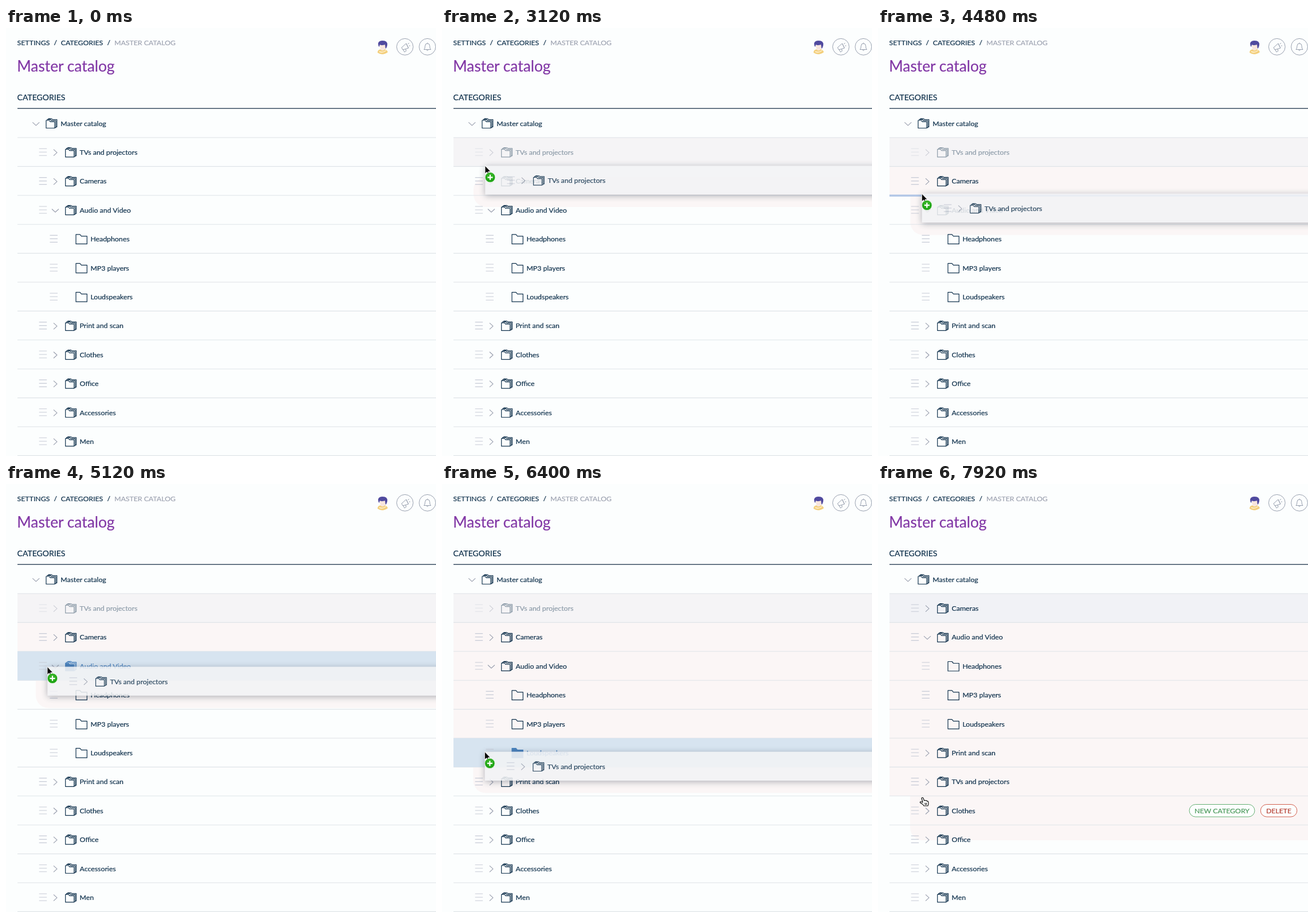
Write an HTML page that moves like this. It is 750 by 746 pixels and loops after 8 s.

```html
<!DOCTYPE html>
<html lang="en">
<head>
<meta charset="utf-8">
<title>Category tree</title>
<style>
  html, body { margin: 0; width: 100%; height: 100%; overflow: hidden; background: #fcfefe; }
  svg { display: block; width: 100%; height: 100%; font: 12.3px Lato, sans-serif; }
  text { fill: #11324d; stroke: #11324d; stroke-width: .22; white-space: pre; }
  path, line { fill: none; stroke-linejoin: round; }
  .folder { stroke: #11324d; stroke-width: 1.2; }
  .grip { stroke: #c7cbd6; stroke-width: 1.1; }
  .chevron { stroke: #999fae; stroke-width: 1.1; }
  .rule { stroke: #dfe4e8; stroke-width: 1.1; }
  .target text { fill: #4a82bd; stroke: #4a82bd; }
  .target .folder { stroke: #4a82bd; }
  .target .front { fill: #4a82bd; }
  .muted { fill: #a0a5b3; stroke: #a0a5b3; }
  .title { fill: #8238a6; stroke: #8238a6; font-size: 26.3px; }
  .create { fill: #4c9a5c; stroke: #4c9a5c; }
  .delete { fill: #b63f32; stroke: #b63f32; }
  .icon { fill: none; stroke: #98a0af; stroke-width: 1; }
  .hand path { fill: #fff; stroke: #111; stroke-width: 1.2; stroke-linecap: round; }
  #ghost { filter: drop-shadow(0 2px 6px rgba(40, 50, 70, .42)); }
</style>
</head>
<body>
<svg viewBox="0 0 750 746" preserveAspectRatio="none">
  <rect width="750" height="746" fill="#fcfefe"/>
  <g id="trail" fill="#fbf6f6">
    <rect id="trailEdge" y="260" width="800" rx="22"/>
    <rect id="trailRows" x="20" y="191" width="730"/>
  </g>
  <rect id="hover" x="20" y="191" width="730" height="50.4" fill="#f1f2f6"/>
  <g id="rules"></g>
  <rect id="into" x="20" width="730" height="50.4" fill="#d7e4f0"/>
  <rect id="between" x="20" width="730" height="3.4" fill="#b1c6e6"/>

  <text x="19.6" y="30">SETTINGS</text>
  <text x="83.5" y="30">/</text>
  <text x="95.7" y="30">CATEGORIES</text>
  <text x="176.5" y="30">/</text>
  <text x="189" y="30" class="muted">MASTER CATALOG</text>
  <text x="19.3" y="75.5" class="title">Master catalog</text>
  <text x="19.6" y="126" font-size="14">CATEGORIES</text>
  <path d="M20 140.2H750" stroke="#3d5065" stroke-width="1.5"/>

  <g id="avatar">
    <path d="M648 43Q648 37 655 37Q664 36 666 42Q657 49 648 43Z" style="fill:#f3cf7c"/>
    <path d="M652 27H662V35Q660 40 655 39Q652 37 652 27Z" style="fill:#f8e6dd"/>
    <path d="M649 27Q650 22 657 22Q666 22 665 30Q664 35 662 36L661 29Q655 31 652 29L651 33Q649 31 649 27Z" style="fill:#504a9f"/>
    <path d="M651 41Q657 44 663 39" stroke="#fff0cf" stroke-width="1.5"/>
  </g>
  <g class="icon">
    <circle cx="695.8" cy="32.8" r="14.4"/>
    <path d="M690 34L698 27L702 35L692 38ZM698 27L702 35M693 38L695 42L698 40L697 36.5M701 28L703 26M703 31H705"/>
    <circle cx="735" cy="32.8" r="14.4"/>
    <path d="M729 37.5Q731 36 731 31Q731 27 735 27Q739 27 739 31Q739 36 741 37.5ZM733.3 38Q735 41 736.7 38M735 27V25.5"/>
  </g>

  <g id="tree"></g>
  <g id="buttons" text-anchor="middle">
    <rect x="543" y="-11" width="114" height="21.6" rx="10.8" fill="#fcfefe" stroke="#66b074"/>
    <text x="600" y="4" class="create">NEW CATEGORY</text>
    <rect x="667.3" y="-11" width="63.5" height="21.6" rx="10.8" fill="#fcfefe" stroke="#d3604f"/>
    <text x="699" y="4" class="delete">DELETE</text>
  </g>
  <g id="ghost" opacity=".87"><rect width="760" height="50.4" fill="#f2f3f5"/></g>

  <g id="pointer" class="hand">
    <path d="M0 1.5Q1.5 -.5 3 1.5L4.5 6Q6 4.5 7 6Q9 5 9.5 7Q11.5 6.5 11.8 8.5Q12.5 12 11 15H4Q2.5 12 -2.5 9.5Q-3 7 -.5 8L2 9ZM6 10L6.5 13M8.5 10V13"/>
  </g>
  <g id="open" class="hand">
    <path d="M-3 13Q-5 9 -7 7Q-7 5 -4 6.5L-5 2Q-4 -.5 -2.6 1.5L-1.5 5L-1.7 0Q0 -2.2 1.2 0L1.5 5L2.4 0.5Q4 -1.2 5 1L4.5 6L5.5 3.5Q7.5 2.5 7.4 5Q7 10 5 12V15H-2ZM-1 8V11M1.5 8V11M4 8V11"/>
  </g>
  <g id="closed" class="hand">
    <path d="M-3 13Q-6 10 -5.5 7Q-5 5.5 -3.5 6V4.5Q-2 2 -.5 4Q1 2 2.3 4Q4 2.6 5 4.6Q7 4.5 7 7Q7 10 5 12V15H-2ZM-1 5V8M2 5V8M4.7 5V8"/>
  </g>
  <g id="arrow">
    <path d="M0 0V14L3.3 11L5.5 16L7.9 15L5.7 10.3H10Z" style="fill:#080808;stroke:#fff;stroke-width:.9"/>
  </g>
  <g id="plus">
    <circle cx="9" cy="20.3" r="8.8" fill="#20a516" stroke="#e9f5e7" stroke-width=".8"/>
    <circle cx="9" cy="18.3" r="6.2" fill="#43be32" opacity=".55"/>
    <path d="M4.5 20.3H13.5M9 15.8V24.8" stroke="#fff" stroke-width="2.2"/>
  </g>
</svg>
<script>
const PITCH = 50.4, TOP = 191, LOOP = 8000, STEP = 80;
const GRAB = 2560, DROP = 7600, SETTLED = 7920;
const $ = id => document.getElementById(id);
const rowTop = i => TOP + PITCH * i;
const rowMiddle = i => rowTop(i) + 25.7;
const set = (el, attrs) => { for (const k in attrs) el.setAttribute(k, attrs[k]); };
const show = (id, on) => set($(id), { visibility: on ? 'visible' : 'hidden' });
const move = (el, x, y) => set(el, { transform: `translate(${x} ${y})` });

const stack = x => `<path class="folder front" d="M${x} 8.2V-5.3H${x + 5.5}L${x + 7.2} -3H${x + 15}V8.2Z"/>
  <path class="folder" d="M${x + 2} -5.5V-7H${x + 7.5}L${x + 9.2} -5H${x + 17}V7.3H${x + 15}M${x + 4} -7V-8.2H${x + 9.5}L${x + 11.2} -6.8H${x + 18.8}V6H${x + 17}"/>`;
const single = x => `<path class="folder front" d="M${x} 8.5V-8H${x + 7}L${x + 9.5} -5H${x + 19.3}V8.5Z"/>`;
const grip = x => `<path class="grip" d="M${x} -6.5h13.5m-13.5 6h13.5m-13.5 6h13.5"/>`;
const chevron = (x, open) =>
  `<path class="chevron" d="${open ? `M${x - 6} -2l6 5.5l6 -5.5` : `M${x - 3} -5l6 5.5l-6 5.5`}"/>`;

function rowMarkup([label, kind]) {
  const text = x => `<text x="${x}" y="4.3">${label}</text>`;
  if (kind === 'root') return chevron(52.3, true) + stack(70) + text(95.2);
  if (kind === 'leaf') return grip(76.5) + single(122) + text(147.4);
  return grip(57.7) + chevron(86, kind === 'open') + stack(103.7) + text(128.6);
}

function addRow(parent, spec) {
  const g = document.createElementNS('http://www.w3.org/2000/svg', 'g');
  g.innerHTML = rowMarkup(spec);
  parent.appendChild(g);
  return g;
}

const moved = ['TVs and projectors'];
const specs = [moved, ['Cameras'], ['Audio and Video', 'open'], ['Headphones', 'leaf'],
  ['MP3 players', 'leaf'], ['Loudspeakers', 'leaf'], ['Print and scan'], ['Clothes'],
  ['Office'], ['Accessories'], ['Men']];
move(addRow($('tree'), ['Master catalog', 'root']), 0, rowMiddle(-1));
const rows = specs.map(spec => addRow($('tree'), spec));
move(addRow($('ghost'), moved), -19.5, 25.7);
$('rules').innerHTML = [...Array(12).keys()]
  .map(i => `<line class="rule" x1="20" x2="750" y1="${rowTop(i)}" y2="${rowTop(i)}"/>`).join('');

// Hot spot of the cursor: time, x, y
const track = [
  [400, 690, 770], [480, 657, 711], [560, 531, 501], [640, 509, 466], [720, 495, 459],
  [1280, 189, 279], [1360, 171, 272], [1600, 96, 239], [1840, 68, 212], [2480, 68, 212],
  [3120, 75, 240], [3600, 79, 270], [4080, 79, 270], [5120, 72, 318.5], [6000, 73, 411.8],
  [6880, 76, 532.4], [7520, 76, 549]
];

function cursorAt(t) {
  const next = track.findIndex(p => p[0] > t);
  if (next < 1) return (next ? track[track.length - 1] : track[0]).slice(1);
  const a = track[next - 1], b = track[next], k = (t - a[0]) / (b[0] - a[0]);
  return [a[1] + (b[1] - a[1]) * k, a[2] + (b[2] - a[2]) * k];
}

function render(t) {
  const [x, y] = cursorAt(t);
  const dragging = t >= GRAB && t < DROP, dropped = t >= DROP;

  const index = Math.floor((y - TOP) / PITCH);
  const part = (y - TOP) / PITCH - index;
  const inside = dragging && index > 0 && part >= .43 && part < .8;
  const fade = Math.min(1, (part - .4) / .05, (.8 - part) / .09);
  const edge = rowTop(part < .43 ? index : index + 1);

  rows.forEach((row, i) => {
    const slot = !dropped || i > 6 ? i : i ? i - 1 : 6;
    move(row, 0, rowMiddle(slot));
    row.classList.toggle('target', inside && i === index);
    const recovering = t < 7680 ? .45 : t < 7760 ? .75 : 1;
    set(row, { opacity: dragging && i === 0 ? .45 : dropped && slot === 0 ? recovering : 1 });
  });

  set($('hover'), { opacity: t < 2000 ? 0 : dragging ? .55 : 1 });
  set($('into'), { y: rowTop(index), opacity: inside ? Math.max(0, fade) : 0 });
  set($('between'), { y: edge - 1.4 });
  show('between', dragging && index > 0 && !inside);

  show('trail', t >= GRAB);
  set($('trailRows'), { height: Math.max(0, edge - TOP) });
  set($('trailEdge'), { x: x - 20, height: Math.max(0, y + 72 - 260) });

  show('buttons', t >= 2000 && t < GRAB || t >= 7680);
  move($('buttons'), 0, rowMiddle(t >= SETTLED ? 7 : 0));
  show('ghost', dragging);
  move($('ghost'), x + .3, y);

  const shape = t < 480 ? '' : t < 1840 || t >= SETTLED ? 'pointer'
    : t < 2400 ? 'open' : t < GRAB ? 'closed' : 'arrow';
  for (const id of ['pointer', 'open', 'closed', 'arrow']) {
    show(id, id === shape);
    move($(id), x, y + (id === 'pointer' ? -3 : 0));
  }
  show('plus', dragging);
  move($('plus'), x, y);
}

function frame(now) {
  render(Math.floor(now % LOOP / STEP) * STEP);
  requestAnimationFrame(frame);
}
render(0);
requestAnimationFrame(frame);
</script>
</body>
</html>
```
